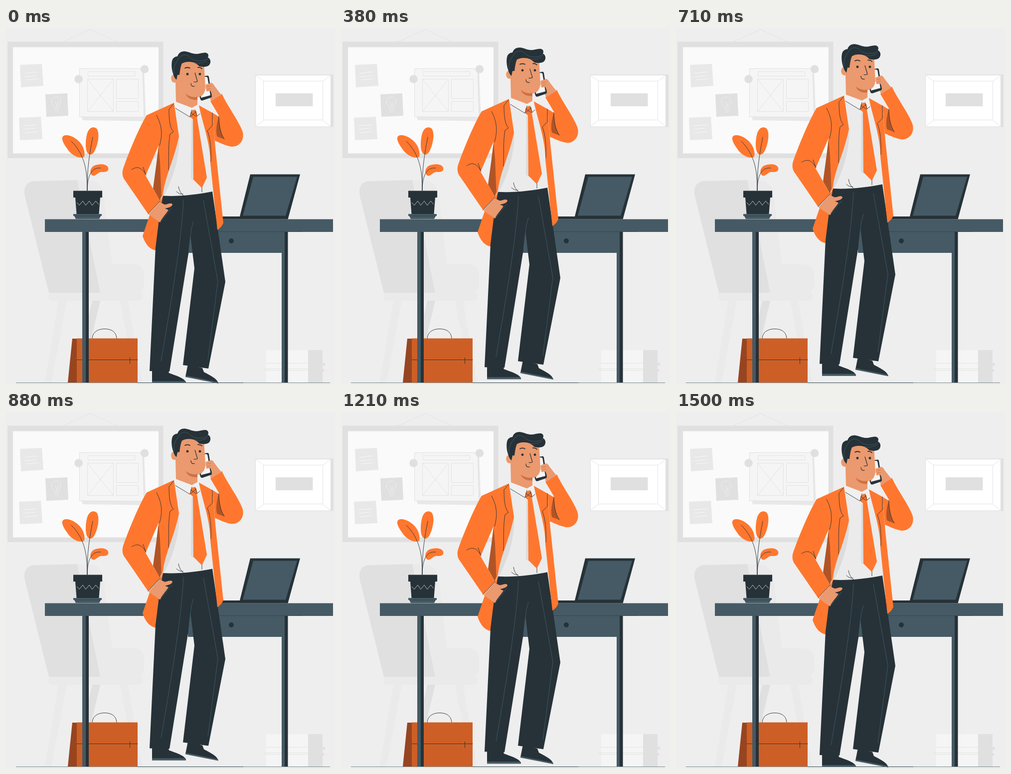
An HTML page that plays this animation: 660x714 px, repeating every 1.54 s.

```html
<!DOCTYPE html>
<html lang="en">
<head>
<meta charset="utf-8">
<title>Phone call at the office</title>
<style>
html, body { margin: 0; width: 100%; height: 100%; overflow: hidden; background: #eee; }
svg { display: block; width: 660px; height: 714px; }
.dark { fill: #263238; }
.slate { fill: #455a64; }
.orange { fill: #ff772e; }
.shade { fill: #b15425; }
.skin { fill: #eb996e; }
.g1 { fill: #e0e0e0; }
.g2 { fill: #e8e8e8; }
.g3 { fill: #f5f5f5; }
.ln { fill: none; stroke: #263238; stroke-width: .9; stroke-linecap: round; stroke-linejoin: round; }
.seam { fill: none; stroke: #455a64; stroke-width: .9; }
.pale { fill: none; stroke: #e3e3e3; stroke-width: 1; }
.white { fill: none; stroke: #fafafa; stroke-width: .9; stroke-linecap: round; }
.brow { stroke-width: 1.8; }
.face { stroke-width: 1.2; }
</style>
</head>
<body>
<svg viewBox="0 0 660 714">
  <rect width="660" height="714" fill="#eee"/>

  <!-- pin board -->
  <path class="pale" d="M114 28L169 3L224 28"/>
  <path class="g1" d="M3 27.500H315.500V261H3z"/>
  <path fill="#fafafa" d="M14 38.500H306V251.500H14z"/>
  <path class="g2" d="M28 74L72 72L75 116L30 119zM26 180L70 178L73 223L28 225z"/>
  <path class="g1" d="M79 133L123 131L125 176L81 178z"/>
  <path class="white" d="M38 91L63 88M37 98L60 96M41 104L64 102M36 196L61 194M36 203L58 201M39 210L62 208"/>
  <path class="white" opacity=".6" d="M97 161C96 154 90 153 91 146C92 137 108 136 110 145C111 152 106 154 106 160zM98 165L106 164M99 169L105 168M99 148L102 158L105 147"/>
  <path class="g2" d="M152 178L270 82L277 82L281 187L154 185z"/>
  <path class="g3" stroke="#e0e0e0" d="M147.500 81.500H274L277 179L147.500 178z"/>
  <path class="pale" d="M164.500 87.500H258.500V96.500H164.500zM163.500 102.500H215.500V167.500H163.500zL215 167M215 103L164 167M221.500 102.500H265.500V141.500H221.500zM221.500 147.500H265.500V167.500H221.500z"/>
  <circle class="g1" cx="145.500" cy="102.500" r="8.300"/>
  <circle class="g1" cx="278" cy="82.500" r="8.300"/>

  <!-- wall picture -->
  <path class="g1" d="M500 93.500H657V198.500H500z"/>
  <path fill="#fff" d="M501 95H651V197.500H501z"/>
  <path class="pale" d="M516.500 106.500H635.500V184.500H516.500zM501 95L517 107M651 95L636 107M501 197L517 185M651 197L636 185"/>
  <path class="g1" d="M541 131H615.500V157H541z"/>

  <!-- chair -->
  <path fill="#eaeaea" d="M143 305L172 306C185 308 193 318 195 331L213 474H256C270 474 277 483 277 494V514C277 525 270 531 262 531H180z"/>
  <path class="g1" d="M37 331C36 316 44 307 58 307L143 305L189 531H86L38 338z"/>
  <path fill="#eaeaea" d="M86 531H273V540Q273 547 266 547H92Q86 547 86 540zM105 547H122L91 711H78zM229 547H245L273 711H260z"/>
  <path class="g1" d="M173 547H189L150 711H136z"/>

  <!-- books -->
  <path class="g3" d="M522 646H606V711H522z"/>
  <path class="g1" d="M606 646H635V672H640V677H635V684H638V689H635V711H606z"/>
  <path class="pale" d="M522 672.500H606M516 683.500H606M519 686.500H606"/>

  <path d="M20 711.500H650" stroke="#7b868b"/>
  <path d="M264 711.500H476" stroke="#37474f"/>

  <!-- briefcase -->
  <path fill="#984420" d="M133 623H142V711H124z"/>
  <path fill="#cd5f26" d="M142 622.500H264V711H142z"/>
  <path class="ln" d="M142 665.500H264M248.500 661V673M173 622C174 609 185 603.500 198 603.500S221 609 222 622"/>

  <!-- desk -->
  <path class="slate" d="M365 409H553V451H365zM153 409H160V711H153zM553 409H559.500V711H553z"/>
  <path class="dark" d="M160 409H166V711H160zM559 409H565.500V711H559z"/>
  <path class="slate" d="M78 383.500H656V409H78z"/>
  <path d="M365 408.500H595" stroke="#37474a"/>
  <circle class="dark" cx="452" cy="427" r="5"/>
  <path class="dark" d="M490 293.500H590L565.500 383.500H425V378H469z"/>
  <path class="slate" d="M496 298.500H584L561 376.500H475z"/>

  <!-- plant -->
  <g class="orange">
    <path d="M156 259C147 262 132 257 122 241C111 226 109 215 121 215C133 215 147 225 153 236C158 246 159 255 156 259z"/>
    <path d="M166 253C158 248 159 225 163 211C167 199 175 197 181 201C188 207 186 228 180 242C176 252 171 256 166 253z"/>
    <path d="M172 295C167 290 169 280 177 276C187 272 199 272 204 278C208 285 203 289 195 289C187 288 186 291 181 294C177 297 174 297 172 295z"/>
  </g>
  <path class="ln" d="M163 326C163 290 160 256 131 227M163 326C162 285 168 250 174 219M163 326C163 300 170 278 190 281"/>
  <path class="dark" d="M135 326.500H193V340H189L186.500 373H141.500L139 340H135z"/>
  <path d="M142 350L147 355.500L154 347L160 355.500L167 347L173 355.500L180 347L186 354" fill="none" stroke="#e0e0e0" stroke-width=".8"/>
  <path class="slate" d="M135 373H192V377H190L187 383H140L137 377H135z"/>
  <path d="M137 377H190" stroke="#263238" stroke-width=".7"/>

  <g id="man">
    <!-- shoes -->
    <path class="dark" d="M293 686H325L327 692C340 697 356 701 361 710V712H293z"/>
    <path class="slate" d="M293 708H360L361 712H293z"/>
    <path class="dark" d="M365 674L394 682L397 690C410 697 422 702 426 712L360 699z"/>
    <path class="slate" d="M360.500 697L425 710L426 713L360 700z"/>

    <!-- coat behind -->
    <path class="shade" d="M307 228L302 270L295 322L309 347L322 300z"/>
    <path class="orange" d="M318 332L300 362L288 376L274 417C279 433 289 445 301 446z"/>

    <!-- shirt -->
    <path fill="#ebebeb" d="M337 150L347 146L375 161L388 155L412 230L416 330L314 340L325 270z"/>
    <path fill="#dcdcdc" d="M347 214C350 248 338 300 315 339L314 325zM372 184H376V306L371 302z"/>

    <!-- trousers -->
    <path class="dark" d="M315 336.500C345 338.500 385 334 414 328L440 509L406 683L355 676L378 482L370 416L366 452L328 689L288 688L300 440L309 368z"/>
    <path class="seam" d="M356 344C352 430 331 550 311 668M376 388Q371 402 370 417M396 346L425 508L405 664M366 452L370 417"/>

    <!-- coat front -->
    <path class="orange" d="M337 150L282 175C268 198 245 252 235 282C232 292 234 300 239 306L285 373L309 347L280 296L306 236L309 270L312 345L315 332C319 298 338 262 347 217z"/>
    <path class="orange" d="M387 155L414 170L420 240L436 391C433 398 429 402 424 405L410 272C410 230 395 195 387 155z"/>
    <path class="orange" d="M414 170L429 179L410 147L433 132C445 158 465 183 474 206C480 223 469 239 452 238C442 236 430 231 419 226z"/>
    <path class="shade" d="M427 177C422 192 420 211 424 218L438 223C430 210 428 194 427 177z"/>
    <path class="ln" d="M302 175C312 194 315 212 308 236M252 284C262 277 272 278 281 295M275 279L280 293M285 373L309 347M336 152L327 163C327 180 328 201 336 208L329 213C325 237 327 258 326 285M414 170V196L404 206C410 222 412 242 411 268M427 177C427 195 430 211 438 223"/>
    <path class="ln" d="M346 318Q348 330 356 336M342 328Q348 334 355 333M393 320V329"/>

    <!-- hand in pocket -->
    <path class="skin" d="M286 374L308 349L318 354C325 354 331 349 334 354C333 359 324 361 319 362L326 365C321 373 312 382 309 390z"/>
    <path class="seam" d="M309 390L333 360"/>

    <!-- phone between palm and fingers -->
    <path class="skin" d="M405 113L412 110Q415 111 418 116L432 134L411 147L408 135z"/>
    <path class="dark" d="M396 97L404 95.500Q406.500 95 407 98L413 137Q413 139 410 140L394 145.500Q391 146 390 143L388 137z"/>
    <path fill="#f5f5f5" d="M396 98H402.500Q404 98 404.500 101L410 135L391 140z"/>
    <path class="skin" d="M402 113L411 110Q415 110 418 116L421 128L412 131L410 126L404 127Q400 127 402 123Q399 121 401 118Q399 114 402 113z"/>
    <path d="M402 118L411 116M403 123L411 121" fill="none" stroke="#c9713f" stroke-width=".8"/>

    <!-- tie and collar -->
    <path class="orange" d="M375 182L383 179L403 300L393 321L376 304z"/>
    <path fill="#f0f0f0" d="M337 150L342 145L375 162L369 179L340 162zM375 162L384 149L390 172L381 178z"/>
    <path class="orange" d="M371 168L376 164L382 167L384 178L376 184L369 178z"/>
    <path class="ln" d="M340 161L369 178.500L373 164M379 164L383 177L389 172M371 170L381 177M381 168L371 177"/>

    <!-- head -->
    <path class="skin" d="M340 93C332 92 330 99 332 105C334 110 338 110 340 109L341 148L373 160L384 154V139C394 138 400 130 400 118L397 68L350 64L344 92z"/>
    <path fill="#cd7143" d="M361 132C368 138 377 140 384 138V144C372 145 363 140 361 132z"/>
    <path class="dark" d="M336 94C332 84 331 70 334 63C337 58 341 57 344 57C346 50 352 46 360 47C368 48 374 52 381 52C390 52 398 47 404 51C407 54 406 57 405 59C411 62 412 70 407 75C401 79 394 78 388 77C380 67 364 65 353 71C350 77 349 87 348 94H344L342 104C339 101 337 98 336 94z"/>
    <path class="seam" d="M337 91C335 73 345 65 349 58C358 50 366 56 370 60C382 69 398 66 406 61M378 69C390 73 397 68 403 66"/>
    <path class="ln brow" d="M359 80.500Q364 78 369 80.500M385 79Q390 78.500 393 81.500"/>
    <circle class="dark" cx="364" cy="92.500" r="2.400"/>
    <circle class="dark" cx="389" cy="92.500" r="2.400"/>
    <path class="ln face" d="M379 90L384 107Q381 109 377 108M371 111Q371 118 378 117"/>
  </g>
</svg>
<script>
const LOOP = 1540, FPS = 24, HALF = 18, RISE = 15.4;
const man = document.getElementById('man');
const start = performance.now();

// Steady rise, then a fall that starts gently and rests at the bottom.
function lift(step) {
  if (step <= HALF) return RISE * step / HALF;
  const u = Math.min(1, (step - HALF) / HALF);
  return RISE * (1 - u ** 1.18);
}

function draw(now) {
  const t = Math.max(0, now - start) % LOOP;
  const step = Math.floor((Math.floor(t / 10) * 10 + 4.9) * FPS / 1000);
  man.setAttribute('transform', `translate(0 ${-lift(step).toFixed(2)})`);
  requestAnimationFrame(draw);
}
draw(start);
</script>
</body>
</html>
```
